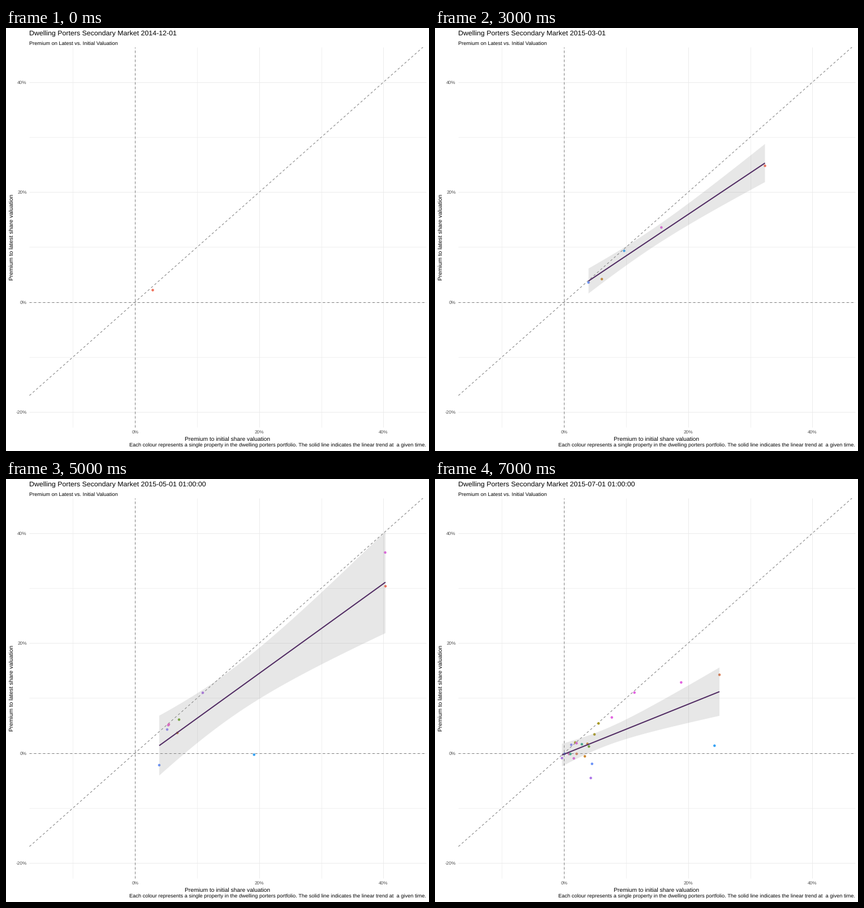
These frames come from a looping animation (748 by 748 pixels, 8 s). A matplotlib script:

```python
import numpy as np
import matplotlib.pyplot as plt
from matplotlib.animation import FuncAnimation

SIZE = 748
DPI = 64
PT = 72 / DPI  # points per pixel
K = 0.935      # theme units to pixels
LEFT, RIGHT, TOP, BOTTOM = 41.5, 742.8, 34, 706
X0, Y0 = 228.2, 484.6  # pixel position of 0%
SX, SY = 10.98, 9.72   # pixels per percent
THIN = 1.067 * K

plt.rcParams["font.family"] = "Liberation Sans"
plt.rcParams["text.hinting"] = "none"

COLOURS = {
    "orange": "#f0705a", "rust": "#d9805a", "brown": "#cd8930",
    "olive": "#a99a1c", "green": "#6ea62a", "teal": "#38ac8c",
    "blue": "#35a2f4", "azure": "#6a92f8", "violet": "#9189f6",
    "purple": "#ad74e8", "magenta": "#e263e0", "pink": "#ee62c6",
}

# Two-sided 95% Student t quantiles by degrees of freedom
T95 = {2: 4.303, 3: 3.182, 4: 2.776, 8: 2.306, 15: 2.131, 20: 2.086}

# Points in stage pixels, one list per month
DEC = [("orange", 259.5, 463)]
JAN = [("orange", 334.5, 411)]
FEB = [("brown", 262, 462), ("azure", 290, 437), ("magenta", 320, 414),
       ("orange", 450, 334)]
MAR = [("azure", 271.5, 450), ("brown", 295, 444), ("blue", 334.5, 394),
       ("magenta", 400.3, 352.7), ("orange", 583.5, 243.7)]
APR = [("violet", 273.7, 445.7), ("azure", 292.5, 431.5),
       ("brown", 300.5, 445.7), ("blue", 375.3, 525.4),
       ("magenta", 545, 233.7), ("orange", 626, 216.5)]
MAY = [("azure", 271, 506), ("violet", 285, 443), ("magenta", 287, 435.3),
       ("pink", 288, 434), ("brown", 303, 449), ("green", 306, 425.5),
       ("purple", 348, 378), ("blue", 438.7, 487.5),
       ("magenta", 670.5, 130), ("orange", 671, 189.6)]
JUN = [("rust", 236, 496.6), ("violet", 251.5, 458.3), ("blue", 254.5, 465),
       ("brown", 279.7, 458), ("brown", 286, 471.2), ("purple", 283.5, 444),
       ("magenta", 286.2, 448.2), ("green", 289.2, 421.5),
       ("magenta", 303.3, 430), ("pink", 306, 430.3), ("azure", 311.5, 472),
       ("green", 326, 427.5), ("magenta", 394, 337.7),
       ("purple", 434.4, 294.6), ("blue", 472.6, 463.2),
       ("rust", 634.5, 234.5), ("magenta", 664, 153.8)]
JUL = [("purple", 224.5, 493.5), ("azure", 229, 486), ("pink", 237, 486.3),
       ("teal", 239.3, 486.3), ("violet", 241, 470), ("magenta", 245.5, 494),
       ("olive", 248, 466), ("magenta", 250.3, 467.2), ("rust", 250.5, 486),
       ("teal", 259.7, 469), ("brown", 265, 490.4), ("brown", 269.6, 468.3),
       ("green", 272.2, 473), ("azure", 277.7, 503.7),
       ("purple", 275.5, 528.7), ("olive", 282, 451.6),
       ("olive", 289.2, 432.2), ("magenta", 312.7, 421.6),
       ("magenta", 352.7, 377.7), ("magenta", 435.3, 359.7),
       ("rust", 503, 346.2), ("blue", 494.3, 471.6)]

MONTHS = [
    ("2014-12-01", DEC), ("2015-01-01", JAN), ("2015-02-01", FEB),
    ("2015-03-01", MAR), ("2015-04-01 01:00:00", APR),
    ("2015-05-01 01:00:00", MAY), ("2015-06-01 01:00:00", JUN),
    ("2015-07-01 01:00:00", JUL),
]

fig = plt.figure(figsize=(SIZE / DPI, SIZE / DPI), dpi=DPI, facecolor="white")
ax = fig.add_axes([0, 0, 1, 1])
ax.set_xlim(0, SIZE)
ax.set_ylim(SIZE, 0)
ax.axis("off")


def px(pct):
    return X0 + SX * pct


def py(pct):
    return Y0 - SY * pct


def label(x, y, text, size, **kw):
    return ax.text(x, y, text, fontsize=size * K * PT, va="baseline", **kw)


def rule(xs, ys, width=THIN, **kw):
    ax.plot(xs, ys, lw=width * PT, solid_capstyle="butt",
            dash_capstyle="butt", **kw)


def draw_grid():
    for pct in range(-20, 41, 10):
        width = THIN if pct % 20 == 0 else 0.7
        style = dict(color="#ebebeb", zorder=1)
        if px(pct) > LEFT:
            rule([px(pct)] * 2, [TOP, BOTTOM], width, **style)
        rule([LEFT, RIGHT], [py(pct)] * 2, width, **style)


def draw_references():
    style = dict(color="#7a7a7a", zorder=2, ls=(0, (4, 4)))
    rule([LEFT, RIGHT], [Y0, Y0], **style)
    rule([X0, X0], [BOTTOM, TOP], **style)
    low, high = (LEFT - X0) / SX, (Y0 - TOP) / SY
    rule([LEFT, px(high)], [py(low), TOP], **style)


def draw_labels():
    label(41.3, 30.3, "Premium on Latest vs. Initial Valuation", 9.9)
    label(392, 729.5, "Premium to initial share valuation", 11, ha="center")
    label(12.7, 370.2, "Premium to latest share valuation", 11,
          ha="center", rotation=90, rotation_mode="anchor")
    label(742.8, 740.6,
          "Each colour represents a single property in the dwelling porters "
          "portfolio. The solid line indicates the linear trend at  a given "
          "time.", 9.9, ha="right")
    for pct in (-20, 0, 20, 40):
        style = dict(color="#4d4d4d")
        label(36.8, py(pct) + 3.2, f"{pct}%", 8.8, ha="right", **style)
        if pct >= 0:
            label(px(pct), 717.3, f"{pct}%", 8.8, ha="center", **style)


def linear_trend(x, y):
    """Least squares line with its 95% confidence half-width."""
    n = len(x)
    dx = x - x.mean()
    sxx = (dx ** 2).sum()
    slope = (dx * y).sum() / sxx
    sse = ((y - y.mean() - slope * dx) ** 2).sum()
    grid = np.linspace(x.min(), x.max(), 80)
    off = grid - x.mean()
    half = T95[n - 2] * np.sqrt(sse / (n - 2) * (1 / n + off ** 2 / sxx))
    return grid, y.mean() + slope * off, half


draw_grid()
draw_references()
draw_labels()
title = label(41.3, 14, "", 13.2)
dots = ax.scatter([], [], s=(4.5 * PT) ** 2, linewidths=0, zorder=3,
                  snap=False)
band, = ax.fill([0, 0, 0], [0, 0, 0], color="#999999", alpha=0.235, lw=0,
                zorder=4)
trend, = ax.plot([], [], color="#502a62", lw=2 * THIN * PT, zorder=5,
                 solid_capstyle="butt")


def update(i):
    date, points = MONTHS[i]
    title.set_text("Dwelling Porters Secondary Market " + date)
    xy = np.array([p[1:] for p in points], dtype=float)
    dots.set_offsets(xy)
    dots.set_facecolors([COLOURS[p[0]] for p in points])
    fitted = len(points) > 2
    band.set_visible(fitted)
    trend.set_visible(fitted)
    if fitted:
        x, y, half = linear_trend(xy[:, 0], xy[:, 1])
        trend.set_data(x, y)
        band.set_xy(np.column_stack([np.r_[x, x[::-1]],
                                     np.r_[y - half, (y + half)[::-1]]]))
    return title, dots, band, trend


anim = FuncAnimation(fig, update, frames=len(MONTHS), interval=1000,
                     repeat=True, repeat_delay=0, blit=False)
plt.show()
```
